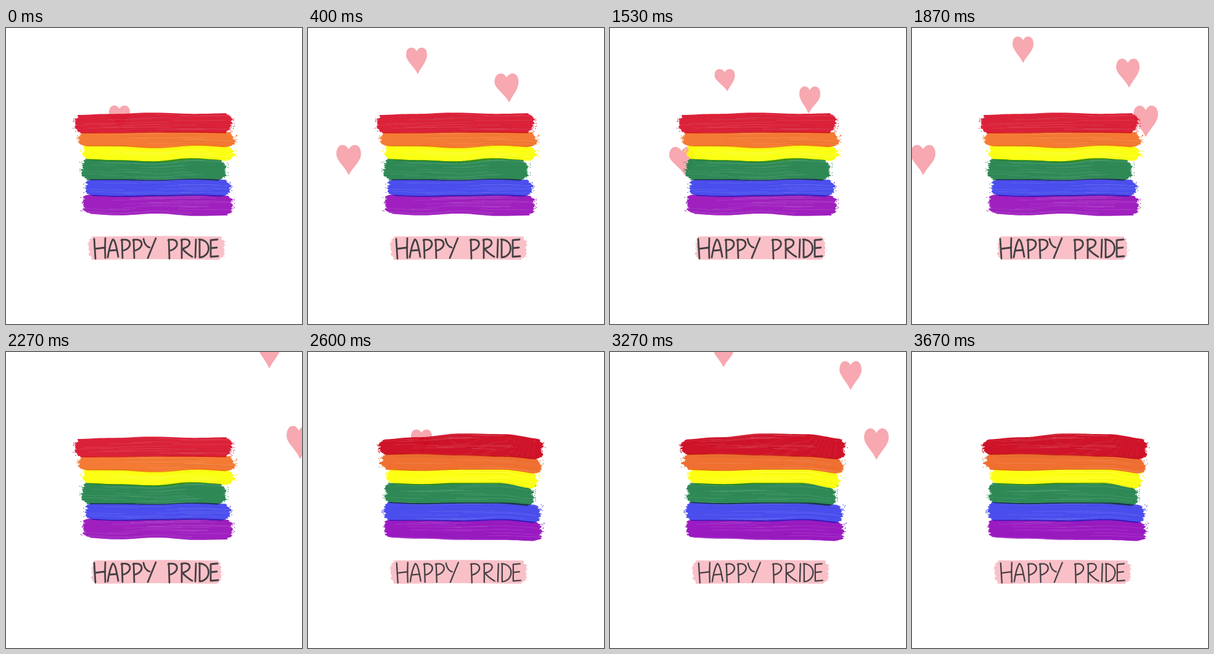
Write an HTML page with a canvas that moves like this. It is 480 px wide and 480 px high and loops after 3740 ms.

```html
<!DOCTYPE html>
<html lang="en">
<head>
<meta charset="utf-8">
<title>Happy Pride</title>
<style>
html, body { margin: 0; width: 100%; height: 100%; overflow: hidden; background: #fff; }
canvas { display: block; width: 480px; height: 480px; }
</style>
</head>
<body>
<canvas id="stage" width="480" height="480" role="img" aria-label="HAPPY PRIDE"></canvas>
<script>
const LOOP = 3740, HEART_STEP = 178.4, FLAG_STEP = 187;
const stage = document.getElementById('stage').getContext('2d');

let seed = 7;
const rand = () => (seed = seed * 16807 % 2147483647) / 2147483647;

function layer(paint) {
  const canvas = document.createElement('canvas');
  canvas.width = canvas.height = 480;
  paint(canvas.getContext('2d'));
  return canvas;
}

// Smooth height of an edge given by evenly spaced points
function edgeAt(points, u) {
  const p = Math.max(0, Math.min(.9999, u)) * (points.length - 1);
  const i = Math.floor(p), k = (1 - Math.cos((p - i) * Math.PI)) / 2;
  return points[i] + (points[i + 1] - points[i]) * k;
}

// A dry brush stroke made of many thin bristles
function brush(ctx, color, x0, x1, top, bottom, rough, streaks) {
  const count = Math.round((bottom[0] - top[0]) * 1.4);
  let left = 0, right = 0;
  const line = (a, b, v, style, width) => {
    ctx.beginPath();
    for (let x = a; x < b + 6; x += 6) {
      const px = Math.min(x, b), u = (px - x0) / (x1 - x0);
      const t = edgeAt(top, u);
      ctx.lineTo(px, t + v * (edgeAt(bottom, u) - t));
    }
    ctx.strokeStyle = style;
    ctx.lineWidth = width;
    ctx.stroke();
  };
  ctx.lineCap = 'round';
  for (let i = 0; i <= count; i++) {
    const v = i / count, taper = rough * Math.abs(2 * v - 1) ** 4;
    left = left * .6 + rand() * rough * .5;
    right = right * .6 + rand() * rough * .5;
    line(x0 + left + taper, x1 - right - taper, v, color, 1.7);
    if (rand() < streaks) {
      const a = x0 + left + rand() * (x1 - x0) * .7;
      const b = Math.min(x1 - right - taper, a + 30 + rand() * 110);
      line(a, b, v, rand() < .65 ? 'rgba(255,255,255,.16)' : 'rgba(0,0,0,.07)', 1.5);
    }
  }
  ctx.fillStyle = color;
  for (let i = 0; i < rough * 3; i++) {
    const x = i % 2 ? x0 + rand() * rough : x1 - rand() * rough;
    const y = top[0] + 3 + rand() * (bottom[0] - top[0] - 6);
    ctx.fillRect(x, y, 1.3, 1.3);
  }
}

const flag = (colors, ends, edges) => layer(ctx => {
  ctx.globalCompositeOperation = 'multiply';
  colors.forEach((color, i) => {
    const stripe = layer(c => {
      c.filter = 'blur(.5px)';
      brush(c, color, ...ends[i], edges[i], edges[i + 1], 9, .6);
    });
    ctx.drawImage(stripe, 0, 0);
  });
});

const flags = [
  flag(['#d8102a', '#f47024', '#fbff00', '#1e8048', '#3c40ec', '#980fba'],
    [[108, 370], [113, 374], [120, 374], [119, 360], [125, 367], [120, 371]],
    [[142, 140, 138, 140, 139], [170, 170, 169, 169, 170], [191, 191, 194, 190, 193],
     [213, 215, 217, 212, 215], [246, 246, 247, 245, 247], [271, 273, 272, 271, 273],
     [300, 303, 300, 304, 303]]),
  flag(['#cc0018', '#ee6420', '#fdff00', '#1e8048', '#3c40ec', '#9208bc'],
    [[111, 384], [114, 381], [124, 376], [121, 369], [119, 381], [120, 383]],
    [[143, 139, 133, 134, 142], [166, 165, 167, 169, 174], [190, 192, 190, 190, 197],
     [213, 215, 213, 213, 222], [244, 246, 245, 245, 249], [273, 273, 274, 272, 277],
     [300, 302, 304, 304, 306]])
];

const labels = [[132, 356], [137, 351]].map(([x0, x1]) => layer(ctx => {
  ctx.filter = 'blur(.4px)';
  brush(ctx, '#f9c0c8', x0, x1, [339, 338, 339], [375, 374, 375], 6, 0);
}));

const letters = [
  'M143 342 L145 374 M161 341 Q160 357 161 373 M145 358 L161 356',
  'M165 372 Q168 352 173 343 Q177 341 182 371 M168 361 L180 360',
  'M188 343 L189 373 M187 344 C203 339 207 356 190 361',
  'M207 343 L208 373 M206 344 C222 339 226 356 209 361',
  'M223 342 Q225 354 233 356 M243 341 Q236 358 230 373',
  'M264 343 L265 374 M263 344 C280 339 283 356 266 361',
  'M285 343 L285 373 M284 344 C300 338 304 354 286 358 Q293 366 302 371',
  'M308 343 L307 372',
  'M314 343 L314 372 M313 343 C334 343 333 371 314 372',
  'M343 343 L332 344 L332 371 L344 370 M332 357 L342 356'
];
const words = [[0, 2.8], [.8, 2.3]].map(([shift, width]) => layer(ctx => {
  ctx.translate(shift, shift / 2);
  ctx.strokeStyle = '#454044';
  ctx.lineWidth = width;
  ctx.lineCap = ctx.lineJoin = 'round';
  letters.forEach(d => ctx.stroke(new Path2D(d)));
}));

// Per drawing: centre x, top, width, height, sideways lean of the tip
const hearts = [
  [[184, 126, 34, 37, 1]],
  [[186, 67, 33, 35, 4], [324, 95, 34, 43, -2], [116, 193, 40, 46, 6]],
  [[176, 32, 34, 42, 2], [322, 74, 39, 46, 4], [66, 190, 40, 48, 0]],
  [[180, 14, 34, 42, 0], [350, 50, 38, 46, 2], [18, 190, 40, 48, 0], [379, 126, 40, 50, 0]],
  [[184, -18, 34, 42, 0], [390, 15, 36, 46, 0], [432, 124, 40, 50, 0]],
  [[427, -22, 36, 48, 0], [475, 120, 40, 53, 2]],
  []
];

function heart([x, y, w, h, lean]) {
  const r = w / 2 - 1;
  stage.beginPath();
  stage.moveTo(x, y + h * .2);
  stage.bezierCurveTo(x - r * .2, y - h * .06, x - r, y - h * .06, x - r, y + h * .3);
  stage.bezierCurveTo(x - r, y + h * .52, x - r * .2 + lean, y + h * .75, x + lean, y + h - 1);
  stage.bezierCurveTo(x + r * .25 + lean, y + h * .75, x + r, y + h * .54, x + r, y + h * .3);
  stage.bezierCurveTo(x + r, y - h * .06, x + r * .2, y - h * .06, x, y + h * .2);
  stage.fill();
  stage.stroke();
}

function draw(now) {
  const t = now % LOOP;
  const pose = Math.floor(t / HEART_STEP) % hearts.length;
  const wobble = Math.floor(t / FLAG_STEP) % 2;
  stage.fillStyle = '#fff';
  stage.fillRect(0, 0, 480, 480);
  stage.fillStyle = stage.strokeStyle = '#f7a8b0';
  stage.lineWidth = 2;
  stage.lineJoin = 'round';
  hearts[pose].forEach(heart);
  stage.globalAlpha = .92;
  stage.drawImage(flags[wobble], 0, 0);
  stage.globalAlpha = 1;
  stage.drawImage(labels[pose % 2], 0, 0);
  stage.drawImage(words[wobble], 0, 0);
}

const start = performance.now();
function tick() {
  draw(performance.now() - start);
  requestAnimationFrame(tick);
}
tick();
</script>
</body>
</html>
```
